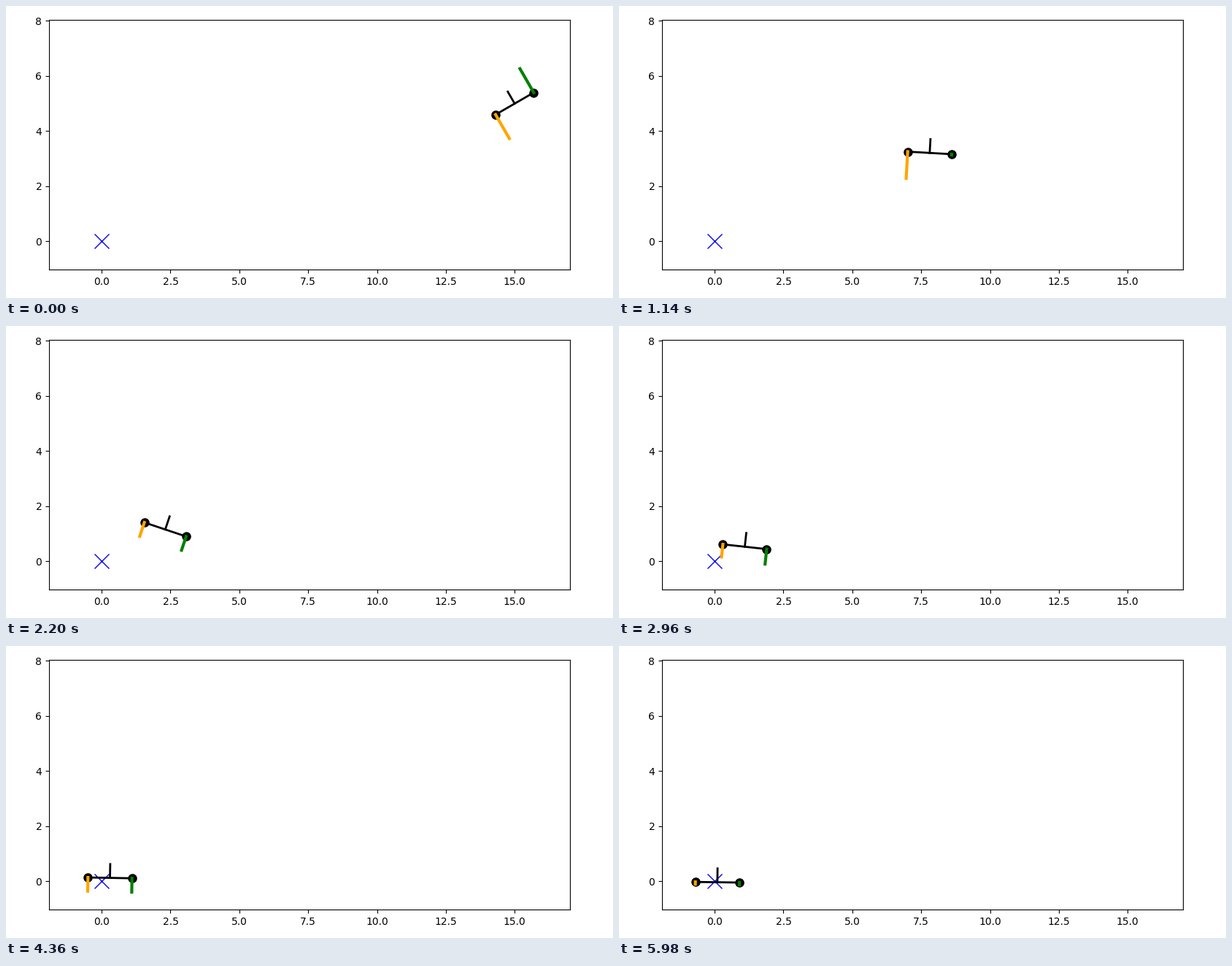
Write a matplotlib script that moves like this. It is 832 px wide and 400 px high and loops after 6000 ms.

```python
import matplotlib.pyplot as plt
import numpy as np
from matplotlib.animation import FuncAnimation

W, H, DPI = 832, 400, 100
FRAMES, INTERVAL = 300, 20
ARM, MAST = 0.8, 0.5
SCALE, X0, Y0 = 37.74, 131.1, 322.4              # pixels per unit, pixel of the origin
LEFT, RIGHT, TOP, BOTTOM = 59, 773, 19, 361
SETTLE = 110                                     # step at which the final glide begins
TURN_GAIN = 6.6


def ramp(t, start, end):
    """Smoothstep from 0 to 1."""
    s = np.clip((t - start) / (end - start), 0, 1)
    return s * s * (3 - 2 * s)


def glide(t, now, rest, rate):
    return rest + (now - rest) * np.exp(-rate * (t - SETTLE))


def hermite(t, knots, vals):
    """Cubic curve through the knots, starting at rest."""
    slope = np.gradient(vals, knots)
    slope[0] = 0
    i = np.clip(np.searchsorted(knots, t, side="right") - 1, 0, len(knots) - 2)
    h = knots[i + 1] - knots[i]
    s = (t - knots[i]) / h
    return ((1 + 2 * s) * (1 - s) ** 2 * vals[i]
            + s * (1 - s) ** 2 * h * slope[i]
            + s * s * (3 - 2 * s) * vals[i + 1]
            + s * s * (s - 1) * h * slope[i + 1])


def travel(t, vals, rest, rate):
    """Fly through the way points, then glide to rest."""
    ends = glide(np.array([SETTLE, SETTLE + 20]), vals[-1], rest, rate)
    path = hermite(t, WAY_STEPS, np.append(vals[:-1], ends))
    return np.where(t < SETTLE, path, glide(t, vals[-1], rest, rate))


t = np.arange(FRAMES)

WAY_STEPS = np.array([0, 16, 31, 45, 57, 75, 90, SETTLE, SETTLE + 20])
xs = travel(t, [15, 14.41, 12.37, 9.93, 7.81, 5.16, 3.61, 2.31], 0.05, 0.0203)
ys = travel(t, [5, 4.82, 4.65, 3.98, 3.21, 2.29, 1.74, 1.157], 0, 0.0205)
ys -= 0.056 * np.clip((t - 282) / 17, 0, 1) ** 3     # sinks as the power fades

# Tilt in degrees: lean in, ease off, then swing over to brake.
lean = 30 + 32 * ramp(t, 0, 13) - 30 * ramp(t, 15, 33)
brake = -0.8 - 35 / (1 + np.exp((t - 110.5) / 22))
swing = ramp(t, 46, 66.8)
tilts = lean * (1 - swing) + brake * swing

# Thrust carries the weight; the difference follows the angular acceleration.
fade = 1 - 0.84 * np.clip((t - 284) / 15, 0, 1) ** 2
lift = 0.5 / np.cos(np.radians(tilts)) * fade
turn = TURN_GAIN * np.gradient(np.gradient(tilts))
lefts = np.clip(lift + turn, -1, 1)
rights = np.clip(lift - turn, -1, 1)

fig = plt.figure(figsize=(W / DPI, H / DPI), dpi=DPI, facecolor="white")
ax = fig.add_axes([LEFT / W, 1 - BOTTOM / H, (RIGHT - LEFT) / W, (BOTTOM - TOP) / H])
ax.set_xlim((LEFT - X0) / SCALE, (RIGHT - X0) / SCALE)
ax.set_ylim((Y0 - BOTTOM) / SCALE, (Y0 - TOP) / SCALE)
ax.set_xticks(np.arange(0, 15.1, 2.5))
ax.set_yticks(np.arange(0, 9, 2))

ax.plot(0, 0, "x", color="blue", ms=14.14, mew=1)
body, = ax.plot([], [], "k-", lw=2)
mast, = ax.plot([], [], "k-", lw=2)
rotors, = ax.plot([], [], "ko", ms=8)
jet_left, = ax.plot([], [], color="orange", lw=3)
jet_right, = ax.plot([], [], color="green", lw=3)


def segment(line, a, b):
    line.set_data([a[0], b[0]], [a[1], b[1]])


def update(k):
    a = np.radians(tilts[k])
    pos = np.array([xs[k], ys[k]])
    along = np.array([np.cos(a), np.sin(a)])
    up = np.array([-np.sin(a), np.cos(a)])
    left, right = pos - ARM * along, pos + ARM * along
    segment(body, left, right)
    segment(rotors, left, right)
    segment(mast, pos, pos + MAST * up)
    segment(jet_left, left, left - lefts[k] * up)
    segment(jet_right, right, right - rights[k] * up)
    return body, mast, rotors, jet_left, jet_right


anim = FuncAnimation(fig, update, frames=FRAMES, interval=INTERVAL,
                     repeat=True, repeat_delay=0)
plt.show()
```
